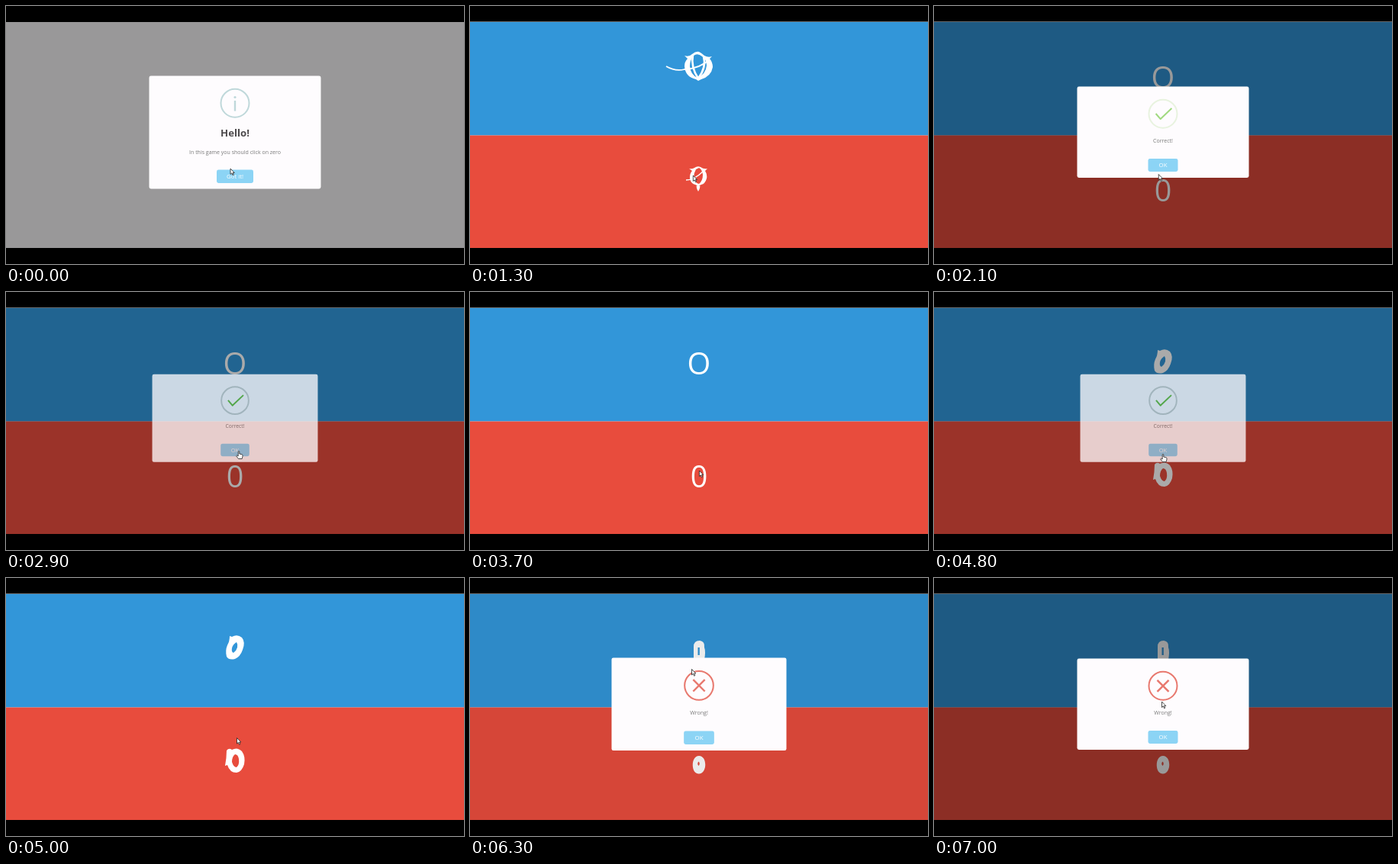
Recreate the animation shown at these times as an HTML page. Size 600 px wide and 338 px high, loop 7100 ms.

```html
<!DOCTYPE html>
<html lang="en">
<head>
<meta charset="utf-8">
<title>Click on zero</title>
<style>
  html, body { margin: 0; width: 100%; height: 100%; overflow: hidden; background: #000; }
  svg { display: block; width: 100%; height: 100%; font-family: "Open Sans", sans-serif; }
  text { text-anchor: middle; }
  .panel { fill: #fefcfe; }
  .message { font-size: 7px; fill: #797979; }
  .button { fill: #8cd4f5; }
  .label { font-size: 7.8px; fill: #fff; }
  .line { fill: none; stroke-width: 2; }
  .glyphs { fill: #fff; stroke: #fff; stroke-width: 0; }
  .glyphs .stroke { fill: none; }
  .cursor { fill: #fff; stroke: #222; stroke-width: .8; stroke-linejoin: round; }
  .hidden { display: none; }
</style>
</head>
<body>
<svg viewBox="0 0 600 338">
  <rect y="21" width="600" height="296" class="panel"/>
  <g id="game">
    <rect y="21" width="600" height="148.5" fill="#3296d9"/>
    <rect y="169.5" width="600" height="147.5" fill="#e84c3d"/>

    <g class="glyphs" id="blackletter">
      <path fill-rule="evenodd" d="M281 65Q287 67 291 63Q296 59 300 60Q304 62 307 65Q312 68 317 66L314 69Q318 74 318 80Q316 92 303 96L299 98L296 96Q282 93 281 79Q281 73 285 69ZM293 65Q288 71 288 79Q289 90 298 94Q309 89 310 78Q310 70 304 66Q298 61 293 65Z"/>
      <path class="stroke" stroke-width="2.6" d="M292 64Q289 80 299 95Q310 80 306 66"/>
      <path class="stroke" stroke-width="1.8" d="M257 79Q269 86 281 83Q301 82 314 70"/>
      <path fill-rule="evenodd" d="M287 213Q291 214 294 212Q298 209 302 211Q306 214 311 213L308 216Q311 221 310 226Q308 233 303 234L299 236L295 234Q289 233 288 225Q288 219 291 216ZM296 214Q293 219 293 225Q295 232 300 233Q305 229 305 221Q304 214 300 212Z"/>
      <path class="stroke" stroke-width="1.5" d="M283 228Q294 228 306 216"/>
      <path d="M296.5 236Q299 234 301.5 236Q301 240 299 243Q297 240 296.5 236Z"/>
    </g>
    <g class="glyphs" id="sans" font-size="39.5">
      <text x="300" y="108">O</text>
      <text x="300" y="256">0</text>
    </g>
    <g class="glyphs" id="marker">
      <path fill-rule="evenodd" d="M293 76L296 77Q303 73 309 78Q314 84 310 94Q307 103 300 106Q292 108 289 103Q287 95 290 88Q293 83 293 76ZM302 84Q297 87 296 92Q295 97 298 98Q302 95 303 91Q304 87 302 84Z"/>
      <path fill-rule="evenodd" d="M289 226Q292 222 296 225Q303 221 309 227Q314 234 312 244Q309 254 302 255Q293 255 290 245L287 246Q289 235 289 226ZM300 231Q296 234 296 241Q298 248 302 248Q306 245 305 237Q304 231 300 231Z"/>
    </g>
    <g class="glyphs" id="blob">
      <path fill-rule="evenodd" d="M293 107V90Q293 82 301 82Q308 83 307 91Q309 96 307 107ZM298.5 91V101H300.8V91Z"/>
      <path fill-rule="evenodd" d="M300 233C311 233 311 256 300 256.500C289 257 289 233 300 233ZM299.500 240.500Q297 243 299.500 246Q302 243 299.500 240.500Z"/>
    </g>
  </g>

  <rect id="shade" y="21" width="600" height="296"/>
  <rect id="edge" y="20" width="600" height="1" fill="#666"/>

  <g id="hello">
    <rect class="panel" x="187.5" y="91.500" width="225" height="148" rx="2.400"/>
    <g stroke="#bfd8da" fill="#bfd8da">
      <circle class="line" cx="300" cy="127.300" r="18.500"/>
      <path stroke="none" d="M298.800 124h2.400v13.600h-2.400z"/>
      <circle stroke="none" cx="300" cy="119.500" r="1.600"/>
    </g>
    <text x="300" y="171.300" font-size="13.2" font-weight="700" fill="#4d4a4c">Hello!</text>
    <text class="message" x="300" y="193.500">In this game you should click on zero</text>
    <rect class="button" x="276" y="214.500" width="48" height="17.500" rx="2.400"/>
    <text class="label" x="300" y="226">Got it!</text>
  </g>

  <g id="correct">
    <rect class="panel" x="187.5" y="105.500" width="225" height="119.500" rx="2.400"/>
    <circle id="ring" class="line" cx="300" cy="141.300" r="18.500"/>
    <g id="check" class="line" stroke-width="2.4">
      <path id="tip"/>
      <path id="long"/>
    </g>
    <text class="message" x="300" y="179">Correct!</text>
    <rect class="button" x="280.5" y="200" width="39" height="17" rx="2.400"/>
    <text class="label" x="300" y="211.300">OK</text>
  </g>

  <g id="wrong">
    <rect class="panel" x="187.5" y="105.500" width="225" height="119.500" rx="2.400"/>
    <g class="line" stroke="#e8786e">
      <circle cx="300" cy="141.300" r="18.500"/>
      <path stroke-width="2.4" d="M292.500 133.800l15 15m0-15l-15 15"/>
    </g>
    <text class="message" x="300" y="179">Wrong!</text>
    <rect class="button" x="280.5" y="200" width="39" height="17" rx="2.400"/>
    <text class="label" x="300" y="211.300">OK</text>
  </g>

  <path id="arrow" class="cursor" d="M0 0V7.500L1.800 5.900L3.100 8.800L4.300 8.200L3.100 5.500H5.300Z"/>
  <path id="hand" class="cursor" d="M-.8 6V1Q0 -.6 .8 1V4L4.200 4.900Q5.400 5.300 5 7L4.200 10.500H-.5L-3.300 6.800Q-2.800 5.300 -.8 7Z"/>
</svg>

<script>
const LOOP = 7100, STEP = 100;
const $ = id => document.getElementById(id);
const show = (id, on) => $(id).classList.toggle("hidden", !on);

const pairs = [[0, ""], [400, "blackletter"], [2000, "sans"], [4300, "marker"], [6300, "blob"]];

// time, dialog, scale, opacity, shade, check progress
const dialogs = [
  [0, "hello", 1, 1, .4, 1],
  [400, "hello", .964, .77, .333, 1],
  [500, "", 1, 0, .12, 1],
  [600, "", 1, 0, 0, 1],
  [2000, "correct", 1.05, 1, .4, .5],
  [2100, "correct", 1, 1, .4, 1],
  [2900, "correct", .964, .77, .333, 1],
  [3000, "", 1, 0, .12, 1],
  [3100, "", 1, 0, 0, 1],
  [4300, "correct", 1.05, 1, .4, .5],
  [4400, "correct", 1, 1, .4, 1],
  [4800, "correct", .964, .77, .333, 1],
  [4900, "", 1, 0, .12, 1],
  [5000, "", 1, 0, 0, 1],
  [6300, "wrong", 1.018, 1, .08, 1],
  [6400, "wrong", .97, 1, .3, 1],
  [6500, "wrong", 1, 1, .4, 1]
];

// time, x, y of the pointer's tip
const pointer = [
  [0, 294, 213], [400, 294, 213], [900, 292, 222], [2000, 293, 222],
  [2500, 305, 208], [2900, 305, 208], [3300, 301, 234], [4000, 300, 234],
  [4300, 299.5, 214.5], [4800, 300, 212], [5000, 302.5, 209.5],
  [5300, 299, 180], [5500, 299, 180], [5800, 290.5, 119.5],
  [6300, 290.5, 119.5], [7000, 298.5, 162], [7100, 298.5, 162]
];
const handTimes = [[2300, 3000], [4300, 4900]];

const latest = (table, t) => table.filter(row => row[0] <= t).pop();

function pointerAt(t) {
  const i = pointer.findIndex(p => p[0] > t);
  const [t0, x0, y0] = pointer[i - 1], [t1, x1, y1] = pointer[i];
  const k = (t - t0) / (t1 - t0), e = k * k * (3 - 2 * k);
  return [x0 + (x1 - x0) * e, y0 + (y1 - y0) * e];
}

function drawCheck(progress, closing) {
  const whole = progress === 1;
  $("tip").setAttribute("d", whole ? "M290.6 141L297 148.4" : "M287.1 138.3L291.9 142.7");
  $("long").setAttribute("d", whole ? "M296.2 148.4L311.4 134" : "M297.1 148.4L307.1 138.8");
  $("check").setAttribute("stroke", closing ? "#62ba35" : "#a0d97f");
  $("ring").setAttribute("stroke", closing ? "#c8ccca" : "#e8f3df");
}

function render(t) {
  const pair = latest(pairs, t)[1];
  const [, dialog, scale, opacity, shade, progress] = latest(dialogs, t);
  show("game", pair);
  show("edge", pair);
  pairs.slice(1).forEach(([, id]) => show(id, id === pair));
  $("shade").setAttribute("opacity", shade);

  ["hello", "correct", "wrong"].forEach(id => show(id, id === dialog));
  if (dialog) {
    $(dialog).setAttribute("transform", `translate(300 165.3) scale(${scale}) translate(-300 -165.3)`);
    $(dialog).setAttribute("opacity", opacity);
  }
  drawCheck(progress, opacity < 1);

  const hand = handTimes.some(([from, to]) => t >= from && t < to);
  const [x, y] = pointerAt(t);
  show("hand", hand);
  show("arrow", !hand);
  $(hand ? "hand" : "arrow").setAttribute("transform", `translate(${x} ${y})`);
}

const start = performance.now();
function tick() {
  const t = (performance.now() - start) % LOOP;
  render(Math.floor(t / STEP) * STEP);
  requestAnimationFrame(tick);
}
tick();
</script>
</body>
</html>
```
